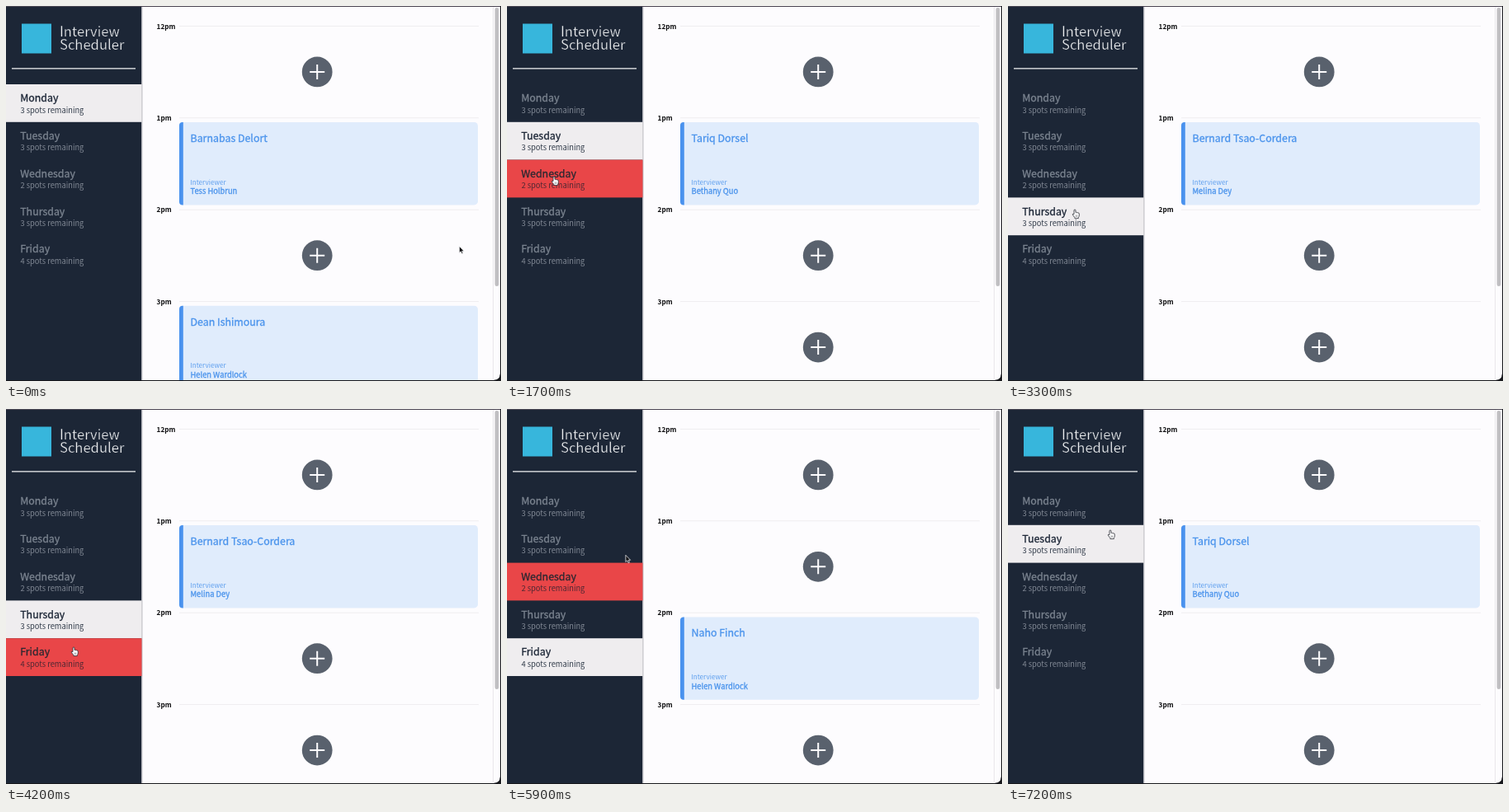
Recreate the animation shown at these times as an HTML page. Size 600x455 px, loop 7300 ms.

```html
<!DOCTYPE html>
<html lang="en">
<head>
<meta charset="utf-8">
<title>Interview Scheduler</title>
<style>
  html, body { margin: 0; width: 100%; height: 100%; overflow: hidden; background: #17181c; }
  svg { display: block; width: 600px; height: 455px; }
  text {
    font-family: "Noto Sans CJK JP", "Noto Sans CJK SC", "Noto Sans CJK", "Open Sans", sans-serif;
    white-space: pre;
    fill: var(--ink);
  }
  /* A hairline stroke stands in for the medium weight. */
  .day, .name, .host { stroke: var(--ink); stroke-width: .3px; }
  .title { --ink: #eceef0; font-size: 16.6px; font-weight: 300; stroke: #1c2636; stroke-width: .25px; }
  .day { --ink: #7b8490; font-size: 12.4px; }
  .spots { --ink: #808894; font-size: 9.3px; font-weight: 300; }
  .row rect { fill: none; }
  .row.hover rect { fill: #e94648; }
  .row.hover .day { --ink: #2c2831; }
  .row.hover .spots { --ink: #4f2833; }
  .row.on rect { fill: #efedef; }
  .row.on .day { --ink: #1c2636; }
  .row.on .spots { --ink: #333d4b; }
  .hour { --ink: #0c0c0e; font-size: 8.2px; font-weight: 600; }
  .name { --ink: #4a93ec; font-size: 12.4px; }
  .label { --ink: #5e9fee; font-size: 8.15px; font-weight: 300; }
  .host { --ink: #4a93ec; font-size: 9.35px; }
</style>
</head>
<body>
<svg id="stage" viewBox="0 0 600 455"></svg>
<script>
const LOOP = 7300, STEP = 100, HOVER_LAG = 100;
const SIDE_W = 164.5, ROW_TOP = 95, ROW_H = 45.8, HOUR_TOP = 24.4, HOUR_H = 111.4;
const HOURS = ["12pm", "1pm", "2pm", "3pm"];

// Each booking: [slot, guest, interviewer]
const DAYS = [
  { name: "Monday", spots: 3, booked: [[1, "Barnabas Delort", "Tess Holbrun"], [3, "Dean Ishimoura", "Helen Wardlock"]] },
  { name: "Tuesday", spots: 3, booked: [[1, "Tariq Dorsel", "Bethany Quo"]] },
  { name: "Wednesday", spots: 2, booked: [[0, "Noel Cordanez", "Harriet Zamil"], [3, "Clara Fenner-Holts", "Harriet Zamil"]] },
  { name: "Thursday", spots: 3, booked: [[1, "Bernard Tsao-Cordera", "Melina Dey"]] },
  { name: "Friday", spots: 4, booked: [[2, "Naho Finch", "Helen Wardlock"]] }
];

// Where the pointer rests: [time, x, y]
const STOPS = [
  [500, 549, 291], [1100, 58, 162], [1700, 57, 207], [2400, 60, 212.5],
  [3300, 81, 247], [4200, 82, 289], [5300, 84, 292], [6000, 146, 172], [6900, 124, 147]
];
const CLICKS = [1200, 2100, 3100, 4400, 6700];

const NS = "http://www.w3.org/2000/svg";
const stage = document.getElementById("stage");

function add(parent, tag, attrs = {}, content = "") {
  const el = document.createElementNS(NS, tag);
  for (const key in attrs) el.setAttribute(key, attrs[key]);
  el.textContent = content;
  return parent.appendChild(el);
}
const rect = (p, x, y, width, height, fill, more) => add(p, "rect", { x, y, width, height, fill, ...more });
const text = (p, x, y, cls, content) => add(p, "text", { x, y, class: cls }, content);
const line = (p, d, stroke, width) => add(p, "path", { d, stroke, "stroke-width": width, fill: "none" });
const hourY = i => HOUR_TOP + i * HOUR_H;

function drawPage() {
  add(stage, "path", { d: "M164 1H599V446Q599 454 591 454H164Z", fill: "#fdfcfe" });
  line(stage, "M590.5 1V453", "#e9e7ea", 1);
  rect(stage, 592.6, 2, 4.6, 338, "#c0bfc2", { rx: 2.3 });
}

function drawSidebar() {
  rect(stage, 0, 0, SIDE_W, 455, "#1c2636");
  rect(stage, SIDE_W, 1, 1.2, 453, "#d3d3d8");
  rect(stage, 19, 21.5, 36, 36, "#37b6dc");
  text(stage, 65, 37, "title", "Interview");
  text(stage, 65, 53, "title", "Scheduler");
  line(stage, "M7 75.9H157", "#f4f5f6", 1.4);
  rect(stage, 0, 0, 600, .9, "#514b58");

  return DAYS.map((day, i) => {
    const y = ROW_TOP + i * ROW_H;
    const row = add(stage, "g", { class: "row" });
    add(row, "rect", { x: 0, y, width: SIDE_W, height: ROW_H });
    text(row, 17.2, y + 21.2, "day", day.name);
    text(row, 17.5, y + 34.5, "spots", `${day.spots} spots remaining`);
    return row;
  });
}

function drawHours() {
  HOURS.forEach((hour, i) => {
    text(stage, 182.6, hourY(i) + 3.2, "hour", hour);
    line(stage, `M210 ${hourY(i)}H573`, "#efedf0", 1);
  });
}

function drawCard(group, y, guest, host) {
  const top = y + 5.2, height = 100.4;
  rect(group, 210, top, 362, height, "#e0ecfc", { rx: 4.5 });
  add(group, "path", { d: `M214.8 ${top}h-.8q-4 0-4 4v${height - 8}q0 4 4 4h.8z`, fill: "#4a92ee" });
  text(group, 223.5, y + 28.9, "name", guest);
  text(group, 223.3, y + 80.8, "label", "Interviewer");
  text(group, 223.5, y + 92.3, "host", host);
}

function drawPlus(group, y) {
  const cy = y + 55.5;
  add(group, "circle", { cx: 377.2, cy, r: 18.4, fill: "#59616d" });
  line(group, `M368.2 ${cy}h18M377.2 ${cy - 9}v18`, "#fdfcfe", 2);
}

function drawSchedule(day) {
  const group = add(stage, "g");
  HOURS.forEach((_, i) => {
    const booking = day.booked.find(b => b[0] === i);
    if (booking) drawCard(group, hourY(i), booking[1], booking[2]);
    else drawPlus(group, hourY(i));
  });
  return group;
}

function drawFrame() {
  add(stage, "path", { d: "M599 0H600V455H0V454H591Q599 454 599 446Z", fill: "#17181c" });
}

function drawPointer(d, fill, stroke) {
  const g = add(stage, "g");
  add(g, "path", { d, fill, stroke, "stroke-width": .75, "stroke-linejoin": "round" });
  return g;
}

function pointAt(t) {
  const next = STOPS.findIndex(s => s[0] > t);
  if (next === 0) return STOPS[0].slice(1);
  if (next < 0) return STOPS[STOPS.length - 1].slice(1);
  const [t0, x0, y0] = STOPS[next - 1], [t1, x1, y1] = STOPS[next];
  const k = (t - t0) / (t1 - t0);
  const ease = k < .5 ? 2 * k * k : 1 - 2 * (1 - k) ** 2;
  return [x0 + (x1 - x0) * ease, y0 + (y1 - y0) * ease];
}

// Index of the day under the pointer, or -1
function rowAt(t) {
  const [x, y] = pointAt(t);
  const i = Math.floor((y - ROW_TOP) / ROW_H);
  return x < SIDE_W && i < DAYS.length ? i : -1;
}

function selectedAt(t) {
  const click = CLICKS.filter(c => c <= t).pop();
  return click ? rowAt(click) : 0;
}

drawPage();
const rows = drawSidebar();
drawHours();
const schedules = DAYS.map(drawSchedule);
drawFrame();
const arrow = drawPointer("M.4 .4V8.6L2.3 6.9L3.6 9.8L5 9.2L3.8 6.4H6.2Z", "#111114", "#f6f6f8");
const hand = drawPointer("M-1 5.6V1a1 1 0 0 1 2 0V3.4q.8-.5 1.5.3q.8-.5 1.5.3q1.3-.2 1.3 1.2V7" +
  "q-.1 1.6-.9 2.4v1.2h-4.5v-.9L-2.6 6.4q-1-1.3 1.6-.8Z", "#f8f8fa", "#22242b");
line(hand, "M1.2 6.6V9M2.7 6.6V9", "#555", .5);

const show = (el, on) => el.setAttribute("visibility", on ? "visible" : "hidden");

function render(t) {
  const selected = selectedAt(t), hovered = rowAt(t - HOVER_LAG);
  rows.forEach((row, i) => {
    row.setAttribute("class", "row" + (i === selected ? " on" : i === hovered ? " hover" : ""));
  });
  schedules.forEach((group, i) => show(group, i === selected));

  // The hand appears once the hover has caught up with the pointer.
  const settled = hovered >= 0 && hovered === rowAt(t);
  show(hand, settled);
  show(arrow, !settled);
  (settled ? hand : arrow).setAttribute("transform", `translate(${pointAt(t)})`);
}

const start = performance.now();
function tick() {
  const t = (performance.now() - start) % LOOP;
  render(Math.floor(t / STEP) * STEP);
  requestAnimationFrame(tick);
}
tick();
</script>
</body>
</html>
```
